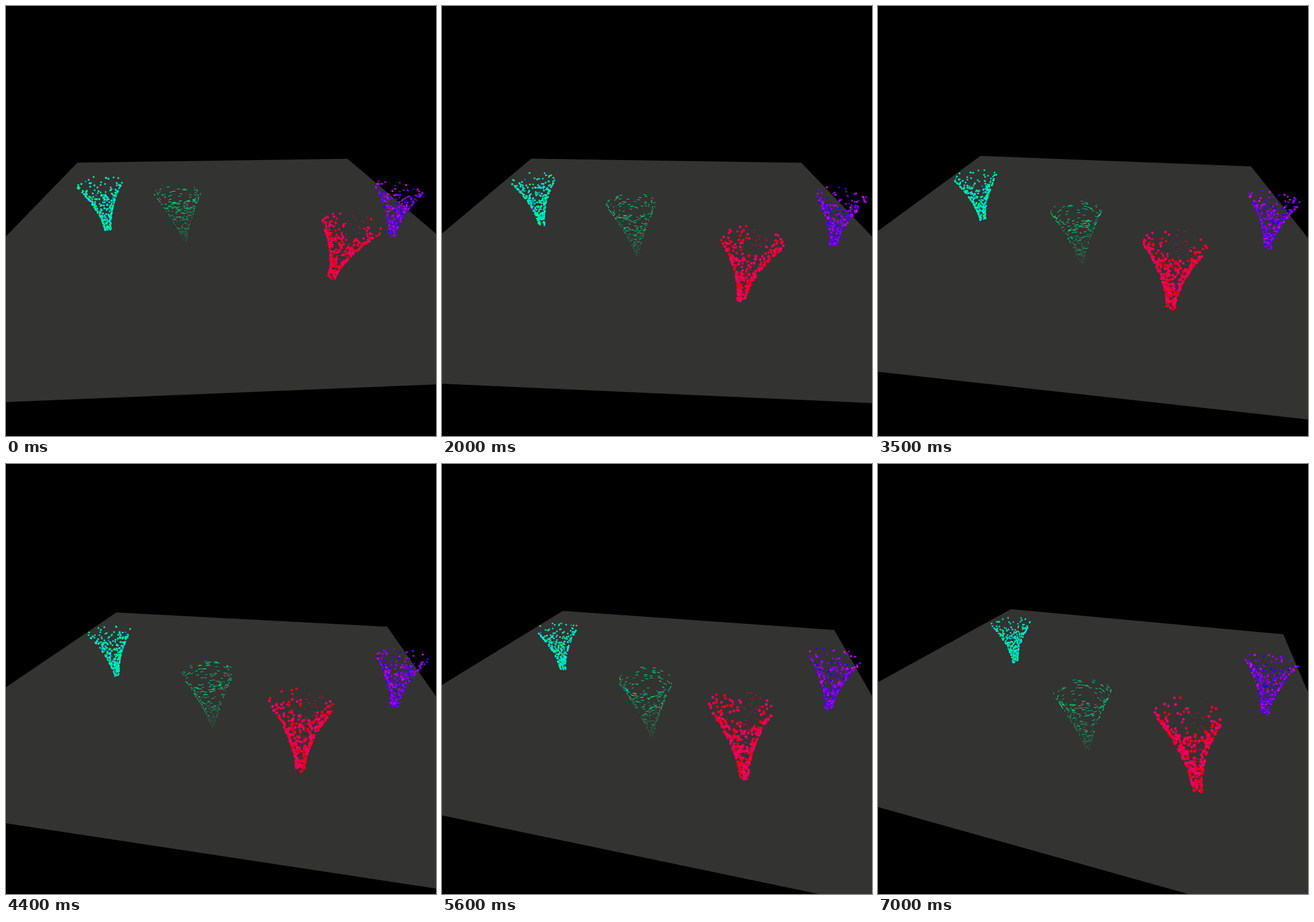
An HTML page with a canvas that plays this animation: 748 by 748 pixels, repeating every 7.1 s.

```html
<!DOCTYPE html>
<html lang="en">
<head>
<meta charset="utf-8">
<title>Tornadoes</title>
<style>
html, body { margin: 0; width: 100%; height: 100%; overflow: hidden; background: #000; }
canvas { display: block; }
</style>
</head>
<body>
<canvas id="stage" width="748" height="748"></canvas>
<script>
const ctx = document.getElementById('stage').getContext('2d');
const MID = 374, LOOP = 7100, STEP = 100, SPAN = LOOP - STEP;

// Camera looks at the ground centre; its distance is the unit of length.
const FOCAL = MID / Math.tan(Math.PI / 6);
const SIN = Math.sqrt(0.2), COS = 2 * SIN;
const CORNER = 0.759, HEIGHT = 0.13, RADIUS = 0.053;

// path: stage points the foot passes at even times
// lean: shift of the top over the ground (right, away) at start and end
const tornadoes = [
  { count: 270, hue: [147, 187], odd: 208, foot: 0.14, bend: 1.75,
    path: [[178, 391], [175, 379], [196, 365], [239, 345]],
    lean: [[-0.003, 0], [0.005, -0.026]] },
  { count: 310, hue: [145, 163], odd: 200, foot: 0.08, bend: 1.3, dash: true,
    path: [[312, 410], [344, 437], [362, 461], [365, 499]],
    lean: [[-0.011, -0.003], [-0.01, 0.007]] },
  { count: 290, hue: [248, 290], odd: 300, foot: 0.14, bend: 1.75,
    path: [[671, 400], [680, 419], [674, 424], [673, 435]],
    lean: [[-0.011, -0.004], [-0.011, 0.007]] },
  { count: 350, hue: [326, 358], odd: 360, foot: 0.14, bend: 1.75, flat: true,
    path: [[566, 472], [516, 514], [514, 534], [556, 568]],
    lean: [[0.016, -0.017], [-0.023, 0.035]] }
];

const mix = (a, b, k) => a + (b - a) * k;

function randomizer(seed) {
  return () => {
    seed = (seed * 1664525 + 1013904223) >>> 0;
    return seed / 4294967296;
  };
}

tornadoes.forEach((t, i) => {
  const rnd = randomizer(71 + i * 977);
  t.parts = Array.from({ length: t.count }, () => {
    const hue = rnd() < 0.06 ? t.odd : mix(...t.hue, rnd());
    return {
      u: Math.pow(rnd(), 0.88),
      angle: rnd() * 2 * Math.PI,
      size: mix(0.9, 1.1, rnd()),
      color: `hsl(${hue.toFixed(0)},100%,46%)`
    };
  });
});

function project(x, h, z) {
  const d = 1 + z * COS - h * SIN;
  return { x: MID + FOCAL * x / d, y: MID - FOCAL * (z * SIN + h * COS) / d, d };
}

// Ground position seen at a stage point
function locate(sx, sy) {
  const q = (MID - sy) / FOCAL;
  const z = q / (SIN - q * COS);
  return { x: (sx - MID) * (1 + z * COS) / FOCAL, z };
}

// Polynomial through evenly spaced points, k from 0 to 1
function along(points, k, axis) {
  const s = k * (points.length - 1);
  return points.reduce((sum, p, i) => sum + points.reduce(
    (w, _, j) => j === i ? w : w * (s - j) / (i - j), p[axis]), 0);
}

function drawGround(turn) {
  ctx.fillStyle = '#333331';
  ctx.beginPath();
  for (let k = 0; k < 4; k++) {
    const a = Math.PI / 4 + k * Math.PI / 2 + turn;
    const p = project(CORNER * Math.cos(a), 0, CORNER * Math.sin(a));
    ctx.lineTo(p.x, p.y);
  }
  ctx.fill();
}

function drawDash(p, x, h, z, a) {
  const len = 0.0037 * mix(0.15, 1, p.u);
  const dx = -Math.sin(a) * len, dz = Math.cos(a) * len;
  const from = project(x - dx, h, z - dz), to = project(x + dx, h, z + dz);
  ctx.globalAlpha = mix(0.3, 1, p.u);
  ctx.strokeStyle = p.color;
  ctx.beginPath();
  ctx.moveTo(from.x, from.y);
  ctx.lineTo(to.x, to.y);
  ctx.stroke();
  ctx.globalAlpha = 1;
}

// Flat discs turn their edge to the viewer at the back right.
function drawDot(p, x, h, z, a, flat) {
  const s = project(x, h, z), r = 1.55 * p.size / s.d;
  const edge = flat && Math.cos(a - 0.95) > 0.92;
  ctx.fillStyle = p.color;
  ctx.beginPath();
  ctx.ellipse(s.x, s.y, r, edge ? r * 0.2 : r, edge ? 0.45 : 0, 0, 2 * Math.PI);
  ctx.fill();
}

function drawTornado(t, ms, turn) {
  const k = ms / SPAN;
  const base = locate(along(t.path, k, 0), along(t.path, k, 1));
  const leanX = along(t.lean, k, 0), leanZ = along(t.lean, k, 1);
  for (const p of t.parts) {
    const a = p.angle + turn + ms * 0.002;
    const r = RADIUS * mix(t.foot, 1, Math.pow(p.u, t.bend));
    const x = base.x + leanX * p.u + r * Math.cos(a);
    const z = base.z + leanZ * p.u + r * Math.sin(a);
    const h = HEIGHT * p.u;
    if (t.dash) drawDash(p, x, h, z, a);
    else drawDot(p, x, h, z, a, t.flat);
  }
}

function draw(ms) {
  const turn = 0.0478 - 0.00005 * ms;
  ctx.fillStyle = '#000';
  ctx.fillRect(0, 0, 748, 748);
  drawGround(turn);
  tornadoes.forEach(t => drawTornado(t, ms, turn));
}

const start = performance.now();
function tick() {
  const ms = (performance.now() - start) % LOOP;
  draw(Math.floor(ms / STEP) * STEP);
  requestAnimationFrame(tick);
}
tick();
</script>
</body>
</html>
```
